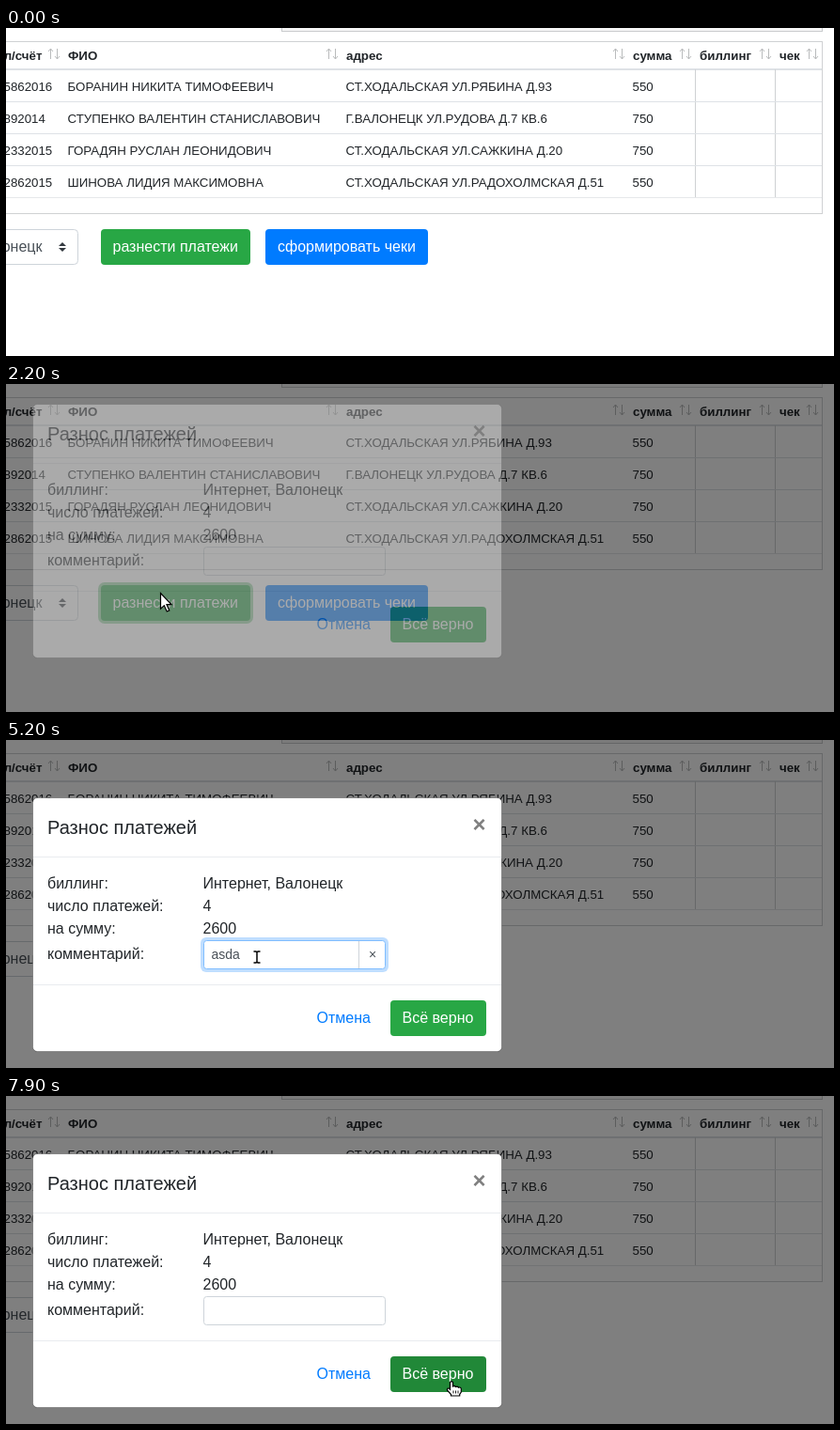
An HTML page that plays this animation: 881x349 px, repeating every 8 s.

```html
<!DOCTYPE html>
<html lang="ru">
<head>
<meta charset="utf-8">
<title>Разнос платежей</title>
<style>
  html, body { margin: 0; width: 100%; height: 100%; overflow: hidden; background: #fff; }
  svg { display: block; width: 881px; height: 349px; }
  text { font-family: "Liberation Sans", Arial, sans-serif; font-size: 16px; fill: #212529; white-space: pre; }
  .cell { font-size: 13.3px; }
  .head { font-size: 13.3px; font-weight: bold; }
  .white { fill: #fff; }
  .muted { fill: #495057; }
</style>
</head>
<body>
<svg id="stage" viewBox="0 0 881 349" xmlns="http://www.w3.org/2000/svg"></svg>
<script>
const LOOP = 8000, STEP = 100;

const text = (x, y, s, cls = '', more = '') => `<text x="${x}" y="${y}" class="${cls}" ${more}>${s}</text>`;
const box = (x, y, w, h, fill, more = '') =>
  `<rect x="${x}" y="${y}" width="${w}" height="${h}" fill="${fill}" ${more}/>`;
const hline = (x1, x2, y, color) => box(x1, y, x2 - x1, 1, color);
const vline = (x, y1, y2, color) => box(x, y1, 1, y2 - y1, color);
const sortIcon = x => `<path d="M${x - 3.5} 33V22m-2.5 3l2.5-3l2.5 3M${x + 3.5} 22v11m-2.5-3l2.5 3l2.5-3"
  fill="none" stroke="#b9bbbc"/>`;

const rows = [
  ['5862016', 'БОРАНИН НИКИТА ТИМОФЕЕВИЧ', 'СТ.ХОДАЛЬСКАЯ УЛ.РЯБИНА Д.93', 550],
  ['892014', 'СТУПЕНКО ВАЛЕНТИН СТАНИСЛАВОВИЧ', 'Г.ВАЛОНЕЦК УЛ.РУДОВА Д.7 КВ.6', 750],
  ['2332015', 'ГОРАДЯН РУСЛАН ЛЕОНИДОВИЧ', 'СТ.ХОДАЛЬСКАЯ УЛ.САЖКИНА Д.20', 750],
  ['2862015', 'ШИНОВА ЛИДИЯ МАКСИМОВНА', 'СТ.ХОДАЛЬСКАЯ УЛ.РАДОХОЛМСКАЯ Д.51', 550],
];
const columns = [-2.5, 65.5, 361.5, 666.5];

function table() {
  const heads = [[66, 'ФИО'], [362, 'адрес'], [667, 'сумма'], [738, 'биллинг'], [823, 'чек']];
  const body = rows.map((row, i) =>
    row.map((value, c) => text(columns[c], 67 + 34 * i, value, 'cell')).join('') +
    hline(0, 868, 78 + 34 * i, i < 3 ? '#dee2e6' : '#e6e8ea')).join('');
  return box(293, -5, 576, 9, '#c9cbcd') + box(294, -5, 574, 8, '#f7f7f7') +
    box(0, 147, 868, 33, '#ececec', 'id="rowHover"') +
    hline(0, 869, 14, '#cfd1d3') + hline(0, 869, 197, '#cfd1d3') + vline(868, 14, 198, '#cfd1d3') +
    box(0, 43, 868, 2, '#dee2e6') + vline(733, 44, 181, '#cfd1d3') + vline(818, 44, 181, '#cfd1d3') +
    text(38.5, 34, 'л/счёт', 'head', 'text-anchor="end"') +
    heads.map(([x, s]) => text(x, 34, s, 'head')).join('') +
    [51, 347, 652, 723, 808, 858].map(sortIcon).join('') + body;
}

function controls() {
  return box(-99.5, 214.5, 176, 37, '#fff', 'rx="4" stroke="#ced4da"') +
    text(38.5, 238, 'онецк', 'muted', 'text-anchor="end"') +
    '<path d="M60 228l-4 4h8zm0 10l-4-4h8z" fill="#343a40"/>' +
    box(98, 211, 165, 44, '#28a745', 'id="payRing" rx="7"') +
    box(101, 214, 159, 38, '#28a745', 'id="pay" rx="4"') + text(113.5, 238, 'разнести платежи', 'white') +
    box(276, 214, 173, 38, '#007bff', 'rx="4"') + text(289, 238, 'сформировать чеки', 'white');
}

function modal() {
  const info = [['биллинг:', 'Интернет, Валонецк'], ['число платежей:', '4'], ['на сумму:', '2600']];
  return box(28.5, 61.5, 499, 270, '#fff', 'rx="5" stroke="#000" stroke-opacity=".3"') +
    text(44, 100, 'Разнос платежей', '', 'style="font-size:20px"') +
    text(503.5, 97.5, '×', '', 'text-anchor="middle" style="font-size:24px;font-weight:bold;fill:#7f7f7f"') +
    hline(29, 527, 124, '#e9ecef') + hline(29, 527, 260, '#e9ecef') +
    info.map(([k, v], i) => text(44, 158 + 24 * i, k) + text(209.5, 158 + 24 * i, v)).join('') +
    text(44, 233, 'комментарий:') +
    box(207, 210, 200, 37, '#bfdeff', 'id="inputRing" rx="6"') +
    box(210.5, 213.5, 193, 30, '#fff', 'id="input" rx="3"') +
    text(218.5, 233, '', 'muted', 'id="typed" style="font-size:14px"') +
    `<g id="clear">${vline(375, 214, 243, '#ced4da')}${text(390, 233, '×', 'muted', 'text-anchor="middle" style="font-size:14px"')}</g>` +
    text(330.5, 301, 'Отмена', '', 'style="fill:#007bff"') +
    box(409, 277, 102, 38, '#28a745', 'id="ok" rx="4"') + text(421.5, 301, 'Всё верно', 'white');
}

// Each pointer shape has its hot spot at 0,0.
const pointers = `
  <path id="arrow" d="M.5 .5V17.2L4.3 13.7L7.2 20L9.8 18.9L7 12.7H12Z" fill="#fff" stroke="#000" stroke-width="1.2"/>
  <g id="hand">
    <path d="M-1.5 1.2Q0-.8 1.5 1.2V5.5Q3.3 4.3 4.5 6Q6.4 5 7.5 6.7Q10 6 10.3 8V11.5L8.7 14V15.5H-.5V14L-4.6 9.5Q-4.5 7-2.7 7.6L-1.5 8.8Z"
      fill="#fff" stroke="#000" stroke-width="1.2"/>
    <path d="M2 10v3M4.5 10v3M7 10v3" stroke="#000" stroke-width=".9"/>
  </g>
  <g id="beam" fill="none">
    <path d="M-3-6H3M0-6V6M-3 6H3" stroke="#fff" stroke-width="3.6"/>
    <path d="M-3.5-6H-1L0-5L1-6H3.5M0-5V5M-3.5 6H-1L0 5L1 6H3.5" stroke="#000" stroke-width="1.5"/>
  </g>`;

document.getElementById('stage').innerHTML = table() + controls() +
  box(0, 0, 881, 349, '#000', 'id="backdrop"') + `<g id="modal">${modal()}</g><g id="pointer">${pointers}</g>`;

const el = id => document.getElementById(id);
const set = (id, name, value) => el(id).setAttribute(name, value);
const show = (id, on) => set(id, 'visibility', on ? 'visible' : 'hidden');
const ramp = (t, from, to) => Math.min(1, Math.max(0, (t - from) / (to - from)));
const mix = (a, b, k) => `rgb(${a.map((v, i) => Math.round(v + (b[i] - v) * k))})`;
const inside = (p, x, y, w, h) => p.x >= x && p.x < x + w && p.y >= y && p.y < y + h;

const GREEN = [40, 167, 69], HOVER = [33, 136, 56], PRESSED = [30, 126, 52];
const BORDER = [206, 212, 218], FOCUS = [128, 189, 255];

// time, x, y of the pointer's hot spot
const route = [
  [600, 146, 150], [700, 151, 176], [800, 156, 202], [900, 158, 216.5], [1200, 164, 222],
  [3000, 164, 222], [3100, 164, 223], [3500, 164, 223], [3600, 183, 227], [3700, 226, 229],
  [3800, 256, 231], [3900, 267, 231], [5400, 267, 231], [5500, 270, 232], [5700, 270, 232],
  [6000, 318, 230], [6300, 381, 226], [6500, 389.5, 222.5], [6600, 390, 223],
  [6900, 392, 268], [7000, 392, 268], [7300, 424, 284], [7600, 466, 300], [7900, 474, 303.5],
];

function pointerAt(t) {
  let i = route.findIndex(p => p[0] > t);
  if (i < 0) i = route.length;
  const a = route[Math.max(0, i - 1)], b = route[Math.min(i, route.length - 1)];
  const k = ramp(t, a[0], b[0] === a[0] ? a[0] + 1 : b[0]);
  return { x: a[1] + (b[1] - a[1]) * k, y: a[2] + (b[2] - a[2]) * k };
}

function pointerKind(t, p, hasText) {
  if (t < 2100) return inside(p, 101, 214, 159, 38) ? 'hand' : 'arrow';
  if (t < 2500) return 'arrow';
  if (inside(p, 409, 277, 102, 38)) return 'hand';
  if (!inside(p, 210, 213, 194, 31)) return 'arrow';
  return p.x > 375 && (hasText || t < 6800) ? 'hand' : 'beam';
}

function typedAt(t) {
  if (t < 5000 || t >= 6700) return '';
  return t < 5200 ? 'asd' : t < 5300 ? 'asda' : 'asdasd';
}

function payColor(t) {
  if (t >= 2000) return mix(HOVER, GREEN, ramp(t, 1950, 2100));
  if (t >= 1800) return mix(PRESSED, HOVER, ramp(t, 1750, 1900));
  if (t >= 1600) return mix(HOVER, PRESSED, ramp(t, 1550, 1700));
  return mix(GREEN, HOVER, ramp(t, 790, 930));
}

function draw(time) {
  const t = Math.floor(time / STEP) * STEP;
  const p = pointerAt(t), typed = typedAt(t);
  const focus = ramp(t, 4200, 4500) * (1 - ramp(t, 7000, 7300));

  show('rowHover', t >= 600 && t < 2100 && inside(p, 0, 147, 868, 34));
  set('pay', 'fill', payColor(t));
  set('payRing', 'opacity', ramp(t, 1550, 1750) / 2);

  set('backdrop', 'opacity', ramp(t, 2100, 2200) / 2);
  set('modal', 'opacity', ramp(t, 2150, 2300));
  const lift = -50 * Math.pow(1 - ramp(t, 2150, 2400), 1.056);
  set('modal', 'transform', `translate(0 ${Math.round(lift)})`);

  set('inputRing', 'opacity', focus);
  set('input', 'stroke', mix(BORDER, FOCUS, focus));
  el('typed').textContent = typed;
  set('clear', 'opacity', typed ? 1 : 0);
  set('ok', 'fill', mix(GREEN, HOVER, ramp(t, 7150, 7300)));

  const kind = pointerKind(t, p, typed !== '');
  set('pointer', 'transform', `translate(${p.x} ${p.y})`);
  set('pointer', 'opacity', t < 600 ? 0 : 1);
  for (const id of ['arrow', 'hand', 'beam']) show(id, id === kind);
}

const start = performance.now();
function tick() {
  draw((performance.now() - start) % LOOP);
  requestAnimationFrame(tick);
}
tick();
</script>
</body>
</html>
```
